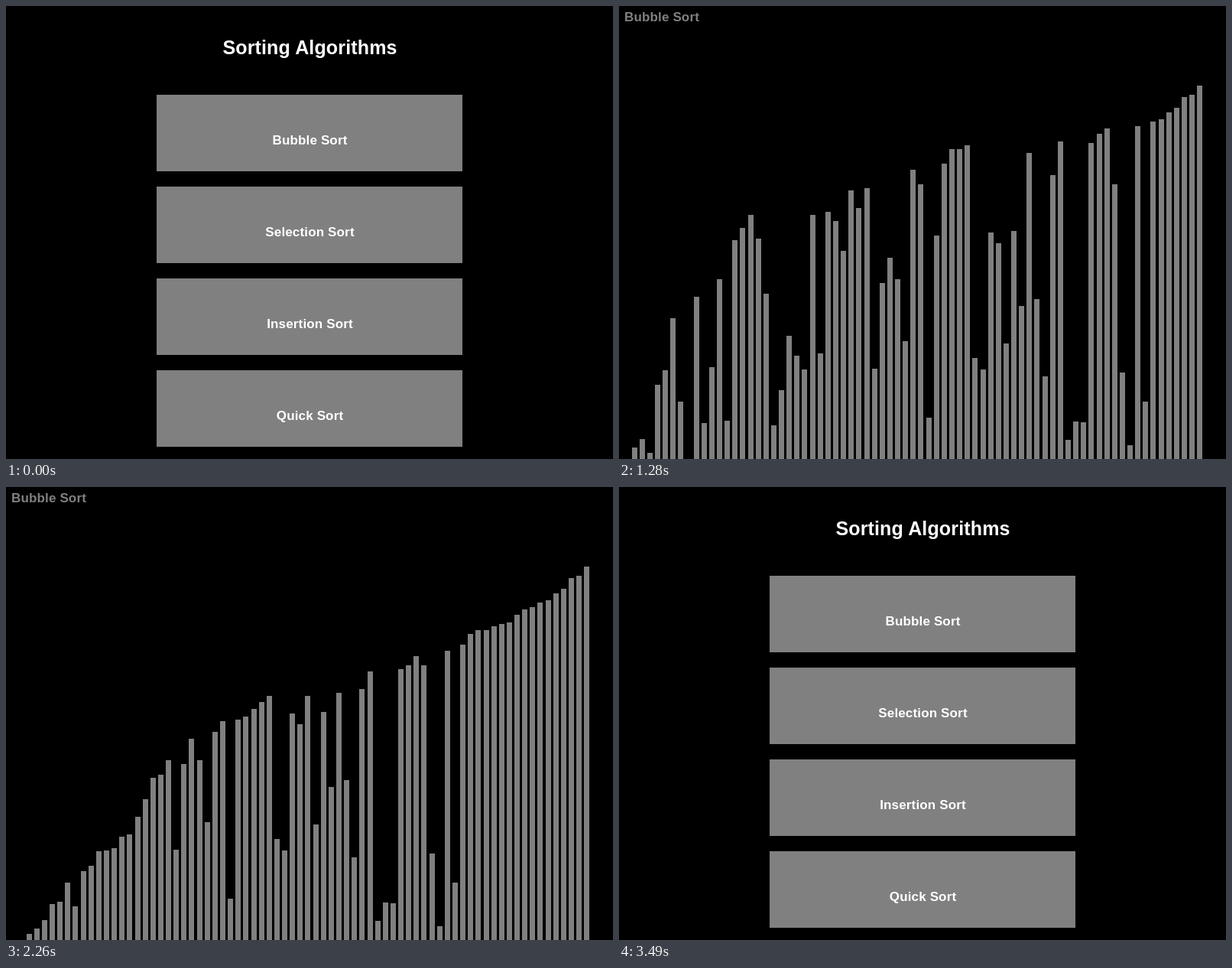
Animation of 794 by 592 pixels, one loop 4360 ms. Source, as an HTML page:

```html
<!DOCTYPE html>
<html lang="en">
<head>
<meta charset="utf-8">
<title>Sorting Algorithms</title>
<style>
  html, body { margin: 0; width: 100%; height: 100%; overflow: hidden; background: #000; }
  svg { display: block; }
  text { font-family: "Liberation Sans", Arial, sans-serif; font-weight: bold; font-size: 17px; letter-spacing: .15px; }
  #menu text { fill: #fff; text-anchor: middle; }
  #menu .title { font-size: 25px; }
  #chart { fill: #808080; }
  rect { shape-rendering: crispEdges; }
</style>
</head>
<body>
<svg width="794" height="592" viewBox="0 0 794 592">
  <g id="menu"><text class="title" x="397.5" y="63">Sorting Algorithms</text></g>
  <g id="chart"><text x="7" y="20">Bubble Sort</text></g>
  <path id="cursor" d="M.5 .5V13.5L3.5 10.8L5.8 16.5L8 15.6L5.7 10H9.8Z" fill="#000" stroke="#fff"/>
</svg>
<script>
const LOOP = 4360, SORT_START = 50, SORT_END = 3490, FLOOR = 592;
const menu = document.getElementById('menu');
const chart = document.getElementById('chart');
const cursor = document.getElementById('cursor');

// Top edge of each bar before sorting
const tops = [
  566, 495, 380, 357, 577, 306, 476, 290, 273, 584, 408, 187, 187, 517, 592,
  167, 545, 472, 157, 542, 273, 269, 238, 304, 376, 548, 502, 431, 457, 475,
  214, 454, 133, 281, 320, 241, 264, 119, 474, 362, 329, 357, 438, 151, 233,
  538, 300, 206, 160, 182, 148, 460, 475, 296, 310, 441, 294, 392, 192, 383,
  484, 221, 177, 567, 543, 544, 179, 116, 104, 233, 479, 574, 139, 517];

// Sorting progress: [step, finished passes, position in the pass]
const marks = [[0, 0, 0], [6, 1, 18], [13, 4, 5], [25, 10, 42], [34, 17, 37], [42, 29, 0], [52, 59, 0]];

function add(parent, name, attrs) {
  const el = document.createElementNS('http://www.w3.org/2000/svg', name);
  for (const key in attrs) el.setAttribute(key, attrs[key]);
  return parent.appendChild(el);
}

['Bubble', 'Selection', 'Insertion', 'Quick'].forEach((name, i) => {
  const y = 116 + 120 * i;
  add(menu, 'rect', { x: 197, y, width: 400, height: 100, fill: '#808080' });
  add(menu, 'text', { x: 397.5, y: y + 65 }).textContent = name + ' Sort';
});

const bars = tops.map((top, i) =>
  add(chart, 'rect', { x: 17 + Math.floor(i * 760 / 75), width: 7 }));

function swap(list, j) {
  [list[j], list[j + 1]] = [list[j + 1], list[j]];
}

// Run the sort once, recording every swap and the swap count at each mark
const swaps = [], counts = [];
const work = tops.slice();
for (let pass = 0; pass < 60; pass++) {
  for (let j = 0; j < work.length - 1 - pass; j++) {
    marks.forEach(([, p, pos], m) => {
      if (p === pass && pos === j) counts[m] = swaps.length;
    });
    if (work[j] < work[j + 1]) {
      swap(work, j);
      swaps.push(j);
    }
  }
}

function swapsAt(step) {
  let m = 0;
  while (m < marks.length - 2 && step >= marks[m + 1][0]) m++;
  const u = (step - marks[m][0]) / (marks[m + 1][0] - marks[m][0]);
  return Math.round(counts[m] + u * (counts[m + 1] - counts[m]));
}

function drawBars(step) {
  const list = tops.slice();
  swaps.slice(0, swapsAt(step)).forEach(j => swap(list, j));
  bars.forEach((bar, i) => {
    bar.setAttribute('y', list[i]);
    bar.setAttribute('height', FLOOR - list[i]);
  });
}

function drawCursor(step) {
  const u = Math.max(0, step - 8) / 3;
  cursor.setAttribute('transform', `translate(${Math.round(395 + 382 * u)} ${Math.round(166 + 20 * u)})`);
  cursor.style.display = step < 12 ? '' : 'none';
}

function draw(t) {
  const sorting = t >= SORT_START && t < SORT_END;
  menu.style.display = sorting ? 'none' : '';
  chart.style.display = sorting ? '' : 'none';
  cursor.style.display = 'none';
  if (!sorting) return;
  // Steps alternate between 60 and 70 ms
  const u = t - SORT_START;
  const step = 2 * Math.floor(u / 130) + (u % 130 >= 60 ? 1 : 0);
  drawBars(step);
  drawCursor(step);
}

const start = performance.now();
function tick() {
  draw((performance.now() - start) % LOOP);
  requestAnimationFrame(tick);
}
tick();
</script>
</body>
</html>
```
